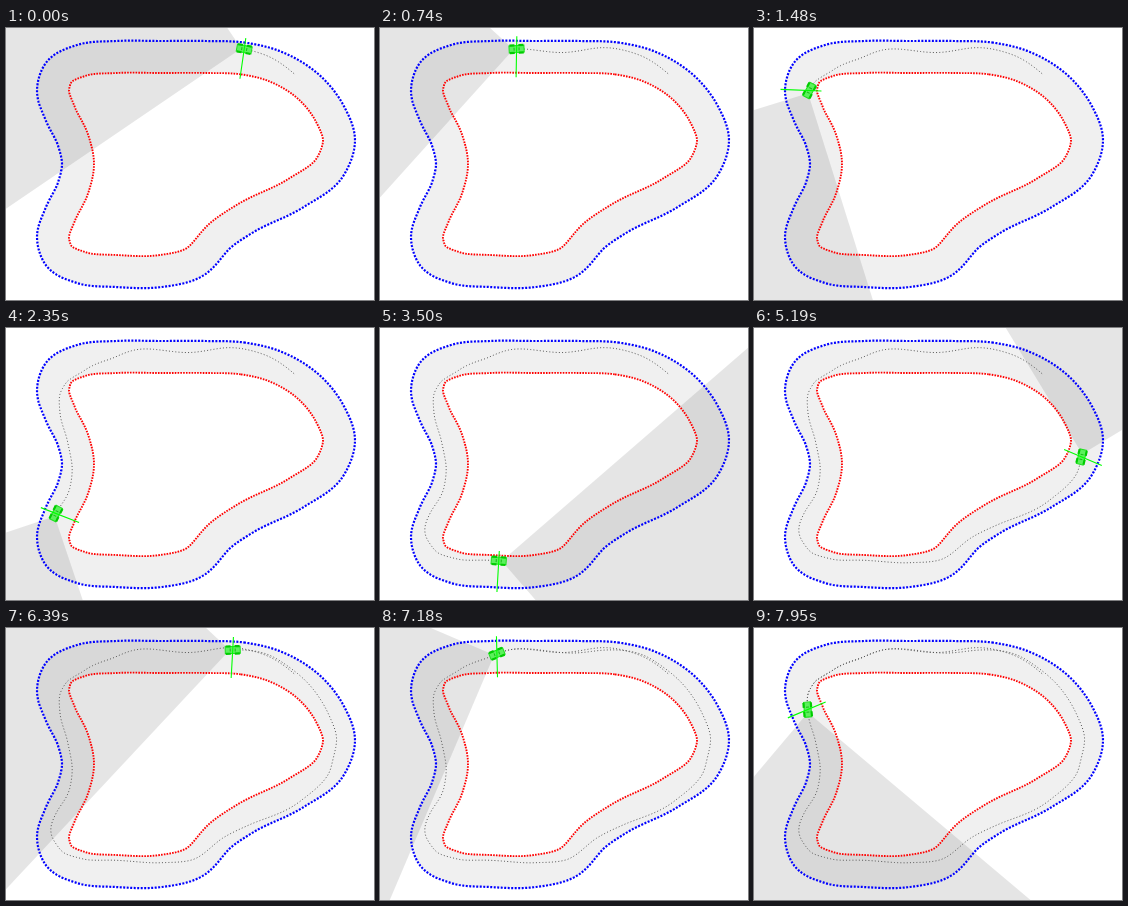
An HTML page with a canvas for the animation above (8 s loop, 368x272 px).

```html
<!DOCTYPE html>
<html lang="en">
<head>
<meta charset="utf-8">
<title>Car on a closed track</title>
<style>
html, body { margin: 0; width: 100%; height: 100%; overflow: hidden; background: #fff; }
canvas { display: block; }
</style>
</head>
<body>
<canvas id="stage" width="368" height="272"></canvas>
<script>
const W = 368, H = 272, LOOP = 8000, HALF_WIDTH = 16, LINE_HALF = 20.5;
const ctx = document.getElementById('stage').getContext('2d');

// Smooth curve through knots [position, value, ...].
function spline(knots) {
  const slope = (i, k) => (knots[i + 1][k] - knots[i][k]) / (knots[i + 1][0] - knots[i][0]);
  const last = knots.length - 1;
  const tangent = (i, k) => {
    if (i === 0) return slope(0, k);
    if (i === last) return slope(last - 1, k);
    const before = knots[i][0] - knots[i - 1][0], after = knots[i + 1][0] - knots[i][0];
    return (slope(i - 1, k) * after + slope(i, k) * before) / (before + after);
  };
  return p => {
    let i = 0;
    while (i < last - 1 && knots[i + 1][0] <= p) i++;
    const a = knots[i], b = knots[i + 1], span = b[0] - a[0];
    const u = (p - a[0]) / span, v = 1 - u;
    return a.slice(1).map((_, j) => {
      const k = j + 1;
      return v * v * (1 + 2 * u) * a[k] + u * u * (3 - 2 * u) * b[k]
           + u * v * span * (v * tangent(i, k) - u * tangent(i + 1, k));
    });
  };
}

// Centre of the track, counter-clockwise; its left half is mirrored about the waist.
const WAIST = 136;
const upperLeft = [[155, 29], [110, 29], [75, 32.5], [53, 44], [47, 62], [54, 85], [67, 112]];
const lowerLeft = upperLeft.map(([x, y]) => [x, 2 * WAIST - y]).reverse();
const centre = [
  [237, 30.5], [200, 29], ...upperLeft, [72, WAIST], ...lowerLeft,
  [187, 235], [216, 206], [240, 190], [290, 165], [324, 139],
  [333, 112], [324, 86], [308, 64], [268, 38]
];

// Stations are lengths along the track, counted from its first point.
const closed = [...centre.slice(-2), ...centre, ...centre.slice(0, 3)];
const stations = [0];
for (let i = 1; i < closed.length; i++) {
  const [a, b] = [closed[i - 1], closed[i]];
  stations.push(stations[i - 1] + Math.hypot(b[0] - a[0], b[1] - a[1]));
}
const LAP = stations[centre.length + 2] - stations[2];
const centreAt = spline(closed.map((p, i) => [stations[i] - stations[2], ...p]));

function trackPoint(station, offset) {
  const s = (station % LAP + LAP) % LAP;
  const [x, y] = centreAt(s), [x0, y0] = centreAt(s - 1), [x1, y1] = centreAt(s + 1);
  const len = Math.hypot(x1 - x0, y1 - y0);
  return [x - (y1 - y0) / len * offset, y + (x1 - x0) / len * offset];
}

// Time to station, and station to distance outward from the centre.
const progress = spline([
  [-400, -53], [0, 0], [1480, 206], [2350, 339], [2680, 364], [3270, 418],
  [3500, 450], [5190, 699], [6390, 862], [7950, 1078], [8350, 1133]
]);
const bends = [
  [109, 6.5], [135, -2.5], [187, -12.8], [206, -8.5], [230, 0], [270, 6.5], [320, 2.5],
  [352, 4], [375, -4], [415, -9.5], [450, -10.7], [490, -8], [562, 4], [635, 10],
  [680, 3.5], [699, -1.5], [730, -2]
];
const weave = spline([
  [-53, 2], [-20, 7.8], [15, 9.6], [50, 4.5], ...bends,
  [800, 4.5], [835, 9.3], [862, 7.5], [892, 4], ...bends.map(([s, d]) => [s + LAP, d])
]);

function carAt(t) {
  const [station] = progress(t);
  return trackPoint(station, weave(station)[0]);
}

function polygon(points) {
  const path = new Path2D();
  points.forEach(p => path.lineTo(...p));
  path.closePath();
  return path;
}

function edge(offset) {
  const points = [];
  for (let s = 0; s < LAP; s += 2) points.push(trackPoint(s, offset));
  return polygon(points);
}
const inner = edge(-HALF_WIDTH), outer = edge(HALF_WIDTH);
const road = new Path2D(inner);
road.addPath(outer);

const trail = [];
for (let t = -400; t < LOOP; t += 20) trail.push([t, ...carAt(t)]);

function stroke(path, color, width, dash = []) {
  ctx.strokeStyle = color;
  ctx.lineWidth = width;
  ctx.setLineDash(dash);
  ctx.stroke(path);
}

function drawCone(x, y, heading) {
  const ax = x + 3 * Math.cos(heading), ay = y + 3 * Math.sin(heading);
  const corner = turn => [ax + 900 * Math.cos(heading + turn), ay + 900 * Math.sin(heading + turn)];
  ctx.fillStyle = 'rgba(0,0,0,0.1)';
  ctx.fill(polygon([[ax, ay], corner(-Math.PI / 4), corner(Math.PI / 4)]));
}

function drawTrail(t) {
  const path = new Path2D();
  for (const [time, x, y] of trail) if (time < t) path.lineTo(x, y);
  stroke(path, '#555', 1, [1, 2.2]);
}

function drawCar(x, y, heading) {
  ctx.save();
  ctx.translate(x, y);
  ctx.rotate(heading);
  const body = new Path2D();
  body.rect(-7.5, -3.5, 15, 7);
  ctx.fillStyle = '#5cf05c';
  ctx.fill(body);
  stroke(body, '#1ee01e', 1);
  ctx.fillStyle = '#00cc00';
  for (const wx of [-4.5, 4.5])
    for (const wy of [-3.7, 3.7]) ctx.fillRect(wx - 2.5, wy - 1.1, 5, 2.2);
  ctx.fillStyle = '#18b818';
  for (const bar of [-3, 2]) ctx.fillRect(bar, -1.5, 1, 3);
  ctx.restore();
}

function draw(t) {
  const [x, y] = carAt(t), [x0, y0] = carAt(t - 10), [x1, y1] = carAt(t + 10);
  const heading = Math.atan2(y1 - y0, x1 - x0);
  const [station] = progress(t);

  ctx.fillStyle = '#fff';
  ctx.fillRect(0, 0, W, H);
  ctx.fillStyle = '#f0f0f0';
  ctx.fill(road, 'evenodd');
  drawCone(x, y, heading);
  stroke(outer, '#0000ff', 2.2, [2, 1.5]);
  stroke(inner, '#ff0000', 1.9, [1.6, 1.2]);
  drawTrail(t);
  drawCar(x, y, heading);
  const cross = polygon([trackPoint(station, -LINE_HALF), trackPoint(station, LINE_HALF)]);
  stroke(cross, '#00ff00', 1.1);
}

const start = performance.now();
function frame() {
  draw((performance.now() - start) % LOOP);
  requestAnimationFrame(frame);
}
frame();
</script>
</body>
</html>
```
